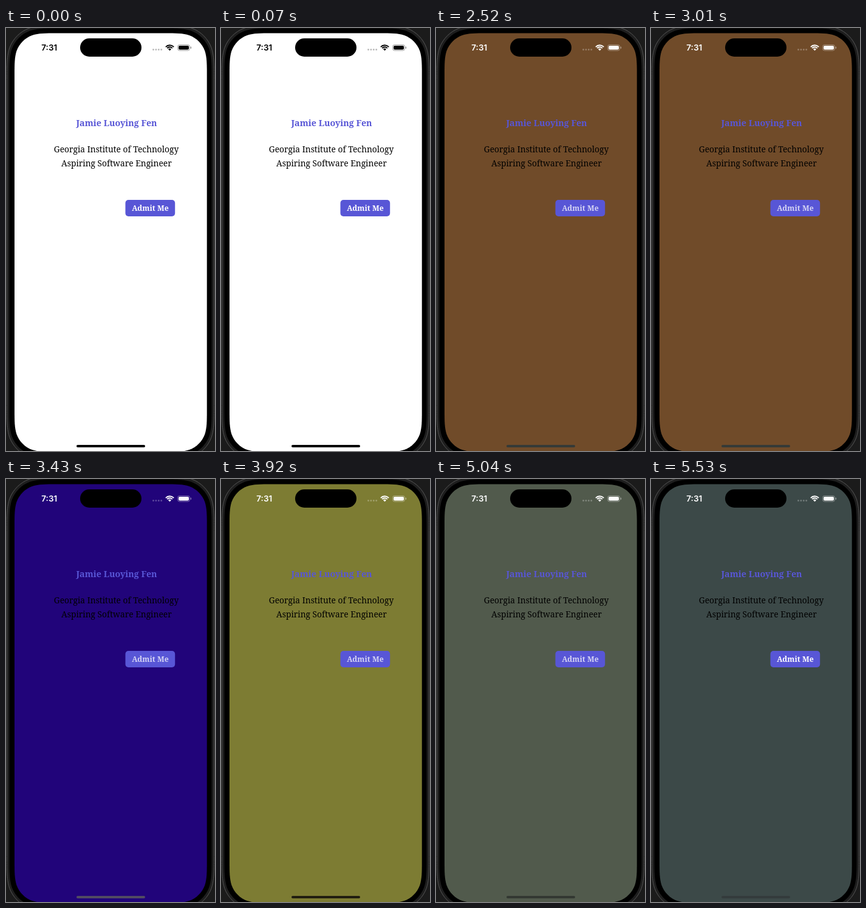
Recreate the animation shown at these times as an HTML page with a canvas. Size 344 by 694 pixels, loop 6930 ms.

```html
<!DOCTYPE html>
<html lang="en">
<head>
<meta charset="utf-8">
<style>
  html, body { margin: 0; width: 100%; height: 100%; overflow: hidden; background: #1b1b1b; }
  canvas { display: block; width: 344px; height: 694px; }
</style>
</head>
<body>
<canvas id="stage"></canvas>
<script>
const W = 344, H = 694, LOOP = 6930, STEP = 70;
const ACCENT = '#5856d6';
const canvas = document.getElementById('stage');
const ctx = canvas.getContext('2d');
const ratio = window.devicePixelRatio || 1;
canvas.width = W * ratio;
canvas.height = H * ratio;
ctx.scale(ratio, ratio);

// Every release of the button picks a new screen colour.
const screens = [
  { at: 0,    color: '#ffffff', home: '#000000' },
  { at: 2100, color: '#3c5a50', home: '#25302c' },
  { at: 2450, color: '#704b29', home: '#353a37' },
  { at: 3150, color: '#21047a', home: '#514b62' },
  { at: 3570, color: '#51415a', home: '#2d2833' },
  { at: 3850, color: '#7d7c33', home: '#201d10' },
  { at: 4480, color: '#3b651e', home: '#383d33' },
  { at: 4900, color: '#515a4c', home: '#333832' },
  { at: 5460, color: '#3c4948', home: '#343b3c' }
];
const presses = [[2380, 2590], [3010, 3150], [3430, 3640], [3850, 4060], [4340, 4480], [4900, 5110], [5460, 5530]];

const clamp = v => Math.max(0, Math.min(1, v));

function paint(fill, stroke) {
  if (fill) { ctx.fillStyle = fill; ctx.fill(); }
  if (stroke) { ctx.strokeStyle = stroke; ctx.lineWidth = 1; ctx.stroke(); }
}

function roundBox(x, y, w, h, r, fill, stroke) {
  ctx.beginPath();
  ctx.roundRect(x, y, w, h, r);
  paint(fill, stroke);
}

// Rectangle whose corners blend gradually into the sides.
function smoothBox(x, y, w, h, r, fill, stroke) {
  const corners = [[x, y, 0, 1, 1, 0], [x + w, y, -1, 0, 0, 1], [x + w, y + h, 0, -1, -1, 0], [x, y + h, 1, 0, 0, -1]];
  ctx.beginPath();
  for (const [cx, cy, inX, inY, outX, outY] of corners) {
    const at = (a, b) => [cx + r * (a * inX + b * outX), cy + r * (a * inY + b * outY)];
    ctx.lineTo(...at(1.528, 0));
    ctx.bezierCurveTo(...at(1.088, 0), ...at(0.868, 0), ...at(0.631, 0.075));
    ctx.bezierCurveTo(...at(0.373, 0.169), ...at(0.169, 0.373), ...at(0.075, 0.631));
    ctx.bezierCurveTo(...at(0, 0.868), ...at(0, 1.088), ...at(0, 1.528));
  }
  ctx.closePath();
  paint(fill, stroke);
}

function label(text, x, y, font, color) {
  ctx.font = font;
  ctx.fillStyle = color;
  ctx.textAlign = 'center';
  ctx.fillText(text, x, y);
}

function drawPhone(color) {
  ctx.fillStyle = '#1b1b1b';
  ctx.fillRect(0, 0, W, H);
  smoothBox(1.5, -4, 341, 712, 58, '#1e1e1e', '#555555');
  smoothBox(5.5, 0.5, 333, 703, 54, '#000000');
  smoothBox(14, 8.5, 316.7, 687, 46, color);
  roundBox(122, 17, 101, 30, 15, '#000000');
}

function drawWifi(x, y, ink) {
  const half = 0.82, up = -Math.PI / 2;
  ctx.strokeStyle = ctx.fillStyle = ink;
  ctx.lineWidth = 1.9;
  for (const r of [9, 5.9]) {
    ctx.beginPath();
    ctx.arc(x, y, r, up - half, up + half);
    ctx.stroke();
  }
  ctx.beginPath();
  ctx.moveTo(x, y);
  ctx.arc(x, y, 3.5, up - half, up + half);
  ctx.fill();
}

function drawStatus(light) {
  const v = Math.round(255 * light);
  const tint = alpha => `rgba(${v},${v},${v},${alpha})`;
  const ink = tint(1);
  label('7:31', 71.3, 37, '600 13.6px Inter, sans-serif', ink);
  ctx.fillStyle = tint(0.27);
  for (let i = 0; i < 4; i++) {
    ctx.beginPath();
    ctx.arc(242.5 + i * 4.4, 35.5, 1.4, 0, Math.PI * 2);
    ctx.fill();
  }
  drawWifi(269.5, 37.2, ink);
  roundBox(282.5, 27.5, 20, 9.5, 3.2, null, tint(0.38));
  roundBox(284, 29, 17, 6.5, 2, ink);
  roundBox(303.7, 30.5, 1.4, 3.5, 0.7, tint(0.42));
}

function drawContent(dim) {
  const serif = '"Noto Serif", serif';
  label('Jamie Luoying Fen', 182, 161, `bold 14.3px ${serif}`, ACCENT);
  label('Georgia Institute of Technology', 181.5, 204, `13.8px ${serif}`, '#000000');
  label('Aspiring Software Engineer', 181.8, 226.7, `13.8px ${serif}`, '#000000');
  roundBox(196.5, 282, 81.7, 27, 5, ACCENT);
  label('Admit Me', 237.5, 300, `bold 12.3px ${serif}`, dim ? '#d5d4f4' : '#ffffff');
}

function draw(now) {
  const t = Math.floor((now % LOOP) / STEP) * STEP;
  const screen = screens.filter(s => s.at <= t).pop();
  const pressed = presses.some(([from, to]) => t >= from && t < to);
  drawPhone(screen.color);
  drawStatus(clamp((t - 2030) / 280));
  drawContent(pressed);
  roundBox(116, 684, 113, 4, 2, screen.home);
}

const start = performance.now();
function tick() {
  draw(performance.now() - start);
  requestAnimationFrame(tick);
}
tick();
</script>
</body>
</html>
```
